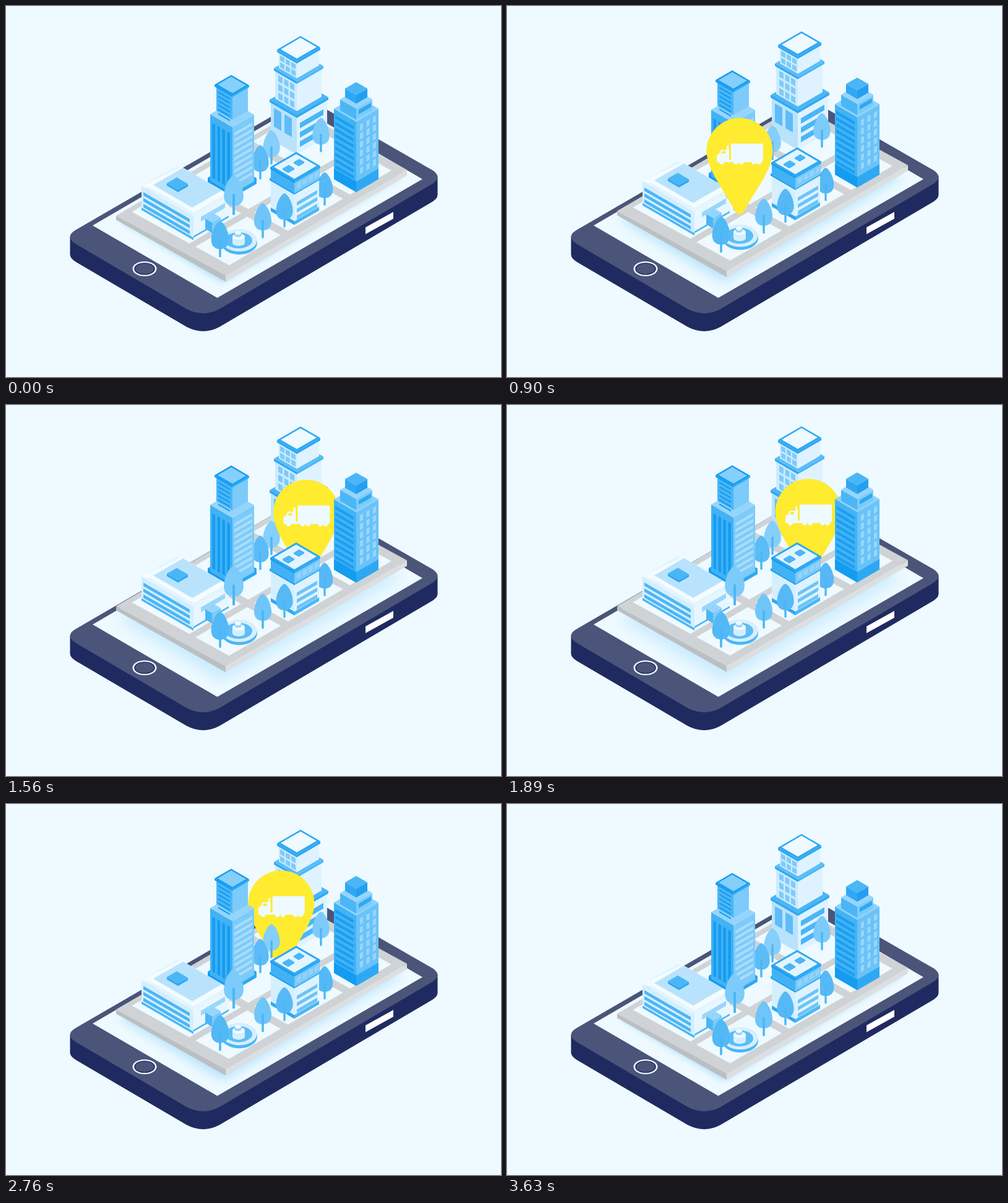
Recreate the animation shown at these times as an HTML page with a canvas. Size 800 by 600 pixels, loop 3660 ms.

```html
<!DOCTYPE html>
<html lang="en">
<head>
<meta charset="utf-8">
<title>City on a phone</title>
<style>
  html, body { margin: 0; width: 100%; height: 100%; overflow: hidden; background: #eefaff; }
  canvas { display: block; }
</style>
</head>
<body>
<canvas id="stage" width="800" height="600"></canvas>
<script>
const ctx = document.getElementById('stage').getContext('2d');
const LOOP = 3660, SLOPE = 0.58;
const PALE = '#eefaff', ICE = '#def3ff', MIST = '#b9e3fd', SKY = '#7ccbfa',
      BLUE = '#4bb6f6', DEEP = '#2fa8f3', STRONG = '#149cf0', NAVY = '#1f2b60', SLATE = '#4b5579';

const clamp = p => Math.min(1, Math.max(0, p));
const ease = p => {
  p = clamp(p);
  const a = p ** 1.75, b = (1 - p) ** 1.75;
  return a / (a + b);
};

function trace(xy) {
  ctx.beginPath();
  for (let i = 0; i < xy.length; i += 2) ctx.lineTo(xy[i], xy[i + 1]);
  ctx.closePath();
}

function poly(color, ...xy) {
  ctx.fillStyle = color;
  trace(xy);
  ctx.fill();
}

function shape(color, path) {
  ctx.fillStyle = color;
  ctx.fill(new Path2D(path));
}

function ellipse(x, y, rx, ry, color) {
  ctx.fillStyle = color;
  ctx.beginPath();
  ctx.ellipse(x, y, rx, ry, 0, 0, 7);
  ctx.fill();
}

// Upright panels lying in a left-facing or a right-facing wall
function panel(x, y, w, h, color, slope) {
  poly(color, x, y, x + w, y + slope * w, x + w, y + slope * w + h, x, y + h);
}
const onLeft = (x, y, w, h, color) => panel(x, y, w, h, color, SLOPE);
const onRight = (x, y, w, h, color) => panel(x, y, w, h, color, -SLOPE);

function grid(draw, x, y, w, h, color, rows, rowGap, cols = 1, colGap = 0) {
  const slope = draw === onLeft ? SLOPE : -SLOPE;
  for (let c = 0; c < cols; c++)
    for (let r = 0; r < rows; r++)
      draw(x + c * colGap, y + r * rowGap + c * colGap * slope, w, h, color);
}

// (x, y) is the front corner of the top; l and r are the widths of the walls
function diamond(x, y, l, r, color) {
  poly(color, x, y, x - l, y - SLOPE * l, x + r - l, y - SLOPE * (l + r), x + r, y - SLOPE * r);
}
function box(x, y, l, r, h, left, right, top) {
  onLeft(x - l, y - SLOPE * l, l, h, left);
  onRight(x, y, r, h, right);
  diamond(x, y, l, r, top);
}

const SCREEN = [140, 355, 341.5, 472, 673, 280, 471, 162];

function phone() {
  const depth = 29;
  const face = 'M113 362L456 163Q483 148 509 162L683 262Q711 276 685 290L345 490Q319 504 292 490L113 385Q94 373 113 362Z';
  ctx.save();
  ctx.translate(0, depth);
  shape(NAVY, face);
  ctx.restore();
  poly(NAVY, 103.5, 373, 697.5, 276, 697.5, 276 + depth, 103.5, 373 + depth);
  shape(SLATE, face);
  poly(PALE, ...SCREEN);
  poly('#fff', 581, 358, 626, 333, 626, 344, 581, 369);
  ellipse(224, 425, 19.5, 12, PALE);
  ellipse(224, 425, 16.8, 9.8, NAVY);
  ellipse(224, 425, 15, 8.5, SLATE);
}

function shadow(lift) {
  ctx.save();
  trace(SCREEN);
  ctx.clip();
  ctx.filter = `blur(${6 + lift * 0.4}px)`;
  ctx.globalAlpha = 0.7 - lift * 0.025;
  poly('#7fcefb', 184, 346, 350, 446, 636, 277, 471, 178);
  ctx.restore();
}

function ground() {
  poly('#bcbfc2', 178, 339, 355, 436, 355, 446, 178, 346);
  poly('#dcdfe1', 355, 436, 648, 265, 648, 274, 355, 446);
  poly('#d0d3d5', 178, 339, 355, 436, 648, 265, 471, 168);
  const spot = (u, v) => [355 + 293 * u - 177 * v, 436 - 171 * u - 97 * v];
  for (const [u0, u1] of [[.06, .345], [.385, .688], [.727, .955]])
    for (const [v0, v1] of [[.068, .375], [.43, .955]])
      poly(PALE, ...spot(u0, v0), ...spot(u1, v0), ...spot(u1, v1), ...spot(u0, v1));
}

function whiteTower() {
  box(470, 178, 42, 49, 62, MIST, ICE, BLUE);
  onLeft(433, 165, 12, 30, '#5fbcf7');
  onLeft(450, 175, 12, 30, '#5fbcf7');
  grid(onRight, 475, 189, 38, 9, BLUE, 3, 15);
  box(470, 177, 44, 51, 4, DEEP, DEEP, BLUE);
  box(470, 124, 35, 40, 46, '#cdeafd', ICE, ICE);
  grid(onLeft, 440, 112, 7, 10, SKY, 3, 14, 3, 9.5);
  box(470, 122, 37, 43, 4, DEEP, BLUE, '#5bbdf7');
  box(470, 90, 29, 36, 27, '#cdeafd', ICE, ICE);
  grid(onLeft, 443, 80, 7, 8, SKY, 2, 11, 3, 9);
  box(470, 89, 32, 38, 4, DEEP, DEEP, DEEP);
  diamond(470, 85, 26, 32, PALE);
}

function darkTower() {
  box(366, 301, 40, 39, 9, STRONG, DEEP, STRONG);
  box(366, 196, 36, 35, 108, '#42b2f5', SKY, '#96d5fb');
  grid(onLeft, 333.5, 189, 4.5, 89, STRONG, 1, 0, 4, 8);
  grid(onRight, 369, 205, 29, 5, '#a9dcfc', 9, 10);
  box(366, 145, 26, 25, 39, BLUE, SKY, SKY);
  grid(onLeft, 343, 138, 19, 2.5, STRONG, 6, 7);
  box(366, 144, 29, 27, 3, STRONG, DEEP, STRONG);
  diamond(366, 141, 24, 22, '#85cffb');
}

function rightTower() {
  box(566, 187, 36, 36, 114, '#42b3f5', '#69c3f9', '#8ed2fb');
  grid(onLeft, 532, 177, 30, 5, '#1c9ff1', 9, 10);
  grid(onRight, 572, 192, 5, 10, '#98d6fb', 6, 14, 3, 10.5);
  onLeft(530, 263, 36, 17, STRONG);
  onRight(566, 284, 36, 17, DEEP);
  box(566, 166, 26, 26, 18, BLUE, SKY, '#96d5fb');
  onRight(570, 168, 20, 7, DEEP);
  box(566, 144, 18, 18, 14, DEEP, '#239ff1', BLUE);
}

function museum() {
  box(303, 340, 84, 57, 35, '#d4eefe', '#e8f7ff', '#e3f5ff');
  poly('#f5fcff', 219, 291, 282, 261, 288, 266, 231, 294);
  diamond(303, 334, 73, 54, '#f5fcff');
  diamond(301, 326, 63, 48, MIST);
  box(278, 297, 18, 16, 4, DEEP, DEEP, BLUE);
  grid(onLeft, 222, 301, 75, 5.5, BLUE, 3, 9.5);
  onLeft(219, 326, 84, 4, BLUE);
  onRight(303, 372, 57, 3, BLUE);
  onRight(315, 341, 39, 8, '#9bd6fb');
  box(333, 350, 11, 14, 17, BLUE, SKY, '#96d5fb');
}

function smallBlock() {
  box(466, 301, 38, 40, 53, '#d6effe', ICE, ICE);
  onLeft(428, 326, 38, 6, DEEP);
  onRight(466, 348, 40, 6, BLUE);
  grid(onRight, 470, 317, 33, 6, '#6cc4f9', 3, 11);
  box(466, 302, 40, 42, 3, STRONG, DEEP, DEEP);
  box(466, 284, 38, 41, 19, '#42b2f5', '#78caf9', BLUE);
  grid(onRight, 470, 287, 7, 9, '#93d3fb', 1, 0, 4, 9.5);
  box(466, 283, 39, 42, 3, STRONG, DEEP, DEEP);
  diamond(466, 279.5, 33, 36, '#e3f5ff');
  box(456, 268, 9, 10, 2, DEEP, DEEP, BLUE);
  box(473, 257, 8, 9, 2, DEEP, DEEP, BLUE);
}

function fountain() {
  ellipse(377, 383, 29, 19, BLUE);
  ellipse(377, 379, 28.5, 18, '#d6effe');
  ellipse(376, 379, 22, 13, '#5cbdf7');
  ellipse(376, 383, 10, 5, '#d6effe');
  ctx.fillRect(366, 373, 20, 10);
  ellipse(376, 373, 10, 5, '#f2fbff');
  ellipse(375, 370, 6, 4, '#9bd6fb');
  ellipse(375, 367, 5, 3, PALE);
}

function tree(x, top, color, size = 1) {
  ctx.save();
  ctx.translate(x, top);
  ctx.scale(size, size);
  shape(color, 'M0 0C7 2 14 18 14 29C14 39 8 44 0 44C-8 44 -14 39 -14 29C-14 18 -7 2 0 0Z');
  ctx.lineCap = 'round';
  ctx.lineWidth = 3.5;
  ctx.strokeStyle = BLUE;
  ctx.stroke(new Path2D('M0 28V55'));
  ctx.restore();
}

function pin(t) {
  const size = ease((t - 400) / 300) * (1 - ease((t - 3240) / 260));
  if (!size) return;
  const first = ease((t - 900) / 720), second = ease((t - 2490) / 540);
  ctx.save();
  ctx.translate(376 + 111 * first - 84 * second,
                344 - 55 * first + 8 * Math.sin(Math.PI * first) - 38 * second);
  ctx.scale(size, size);
  shape('#ffeb30', 'M-7 -4C-22 -34 -53.5 -72 -53.5 -102A53.5 53.5 0 0 1 53.5 -102C53.5 -72 22 -34 7 -4Q0 5 -7 -4Z');
  truck();
  ctx.restore();
}

function truck() {
  ctx.fillStyle = PALE;
  ctx.fillRect(-14, -114, 52, 27);
  ctx.fillRect(-21, -111, 3.5, 10);
  ctx.fillRect(-18, -88, 55, 4);
  shape(PALE, 'M-37 -84V-95L-33 -98L-30 -104H-17V-84Z');
  poly('#ffeb30', -30, -98, -28, -102, -23, -102, -23, -98);
  for (const x of [-29, -6, 3, 23, 31]) ellipse(x, -84, 3.8, 3.8, PALE);
}

function draw(now) {
  const t = now % LOOP;
  const lift = 14 * (ease(t / 1740) - ease((t - 1900) / 1700));
  const behind = t > 2560;
  ctx.fillStyle = PALE;
  ctx.fillRect(0, 0, 800, 600);
  phone();
  shadow(lift);
  ctx.save();
  ctx.translate(0, -lift);
  ground();
  whiteTower();
  tree(509, 181, SKY, .98);
  if (behind) pin(t);
  tree(429, 201, '#85cffa', .98);
  tree(411, 225, '#5cbcf7', .98);
  darkTower();
  museum();
  tree(368, 274, SKY, 1.13);
  if (!behind) pin(t);
  rightTower();
  tree(515, 269, '#56b9f6', .95);
  smallBlock();
  tree(450, 303, '#56b9f6', .97);
  fountain();
  tree(415, 319, '#6fc5f9');
  tree(346, 348, '#53b8f6', 1.03);
  ctx.restore();
  requestAnimationFrame(draw);
}
requestAnimationFrame(draw);
</script>
</body>
</html>
```
